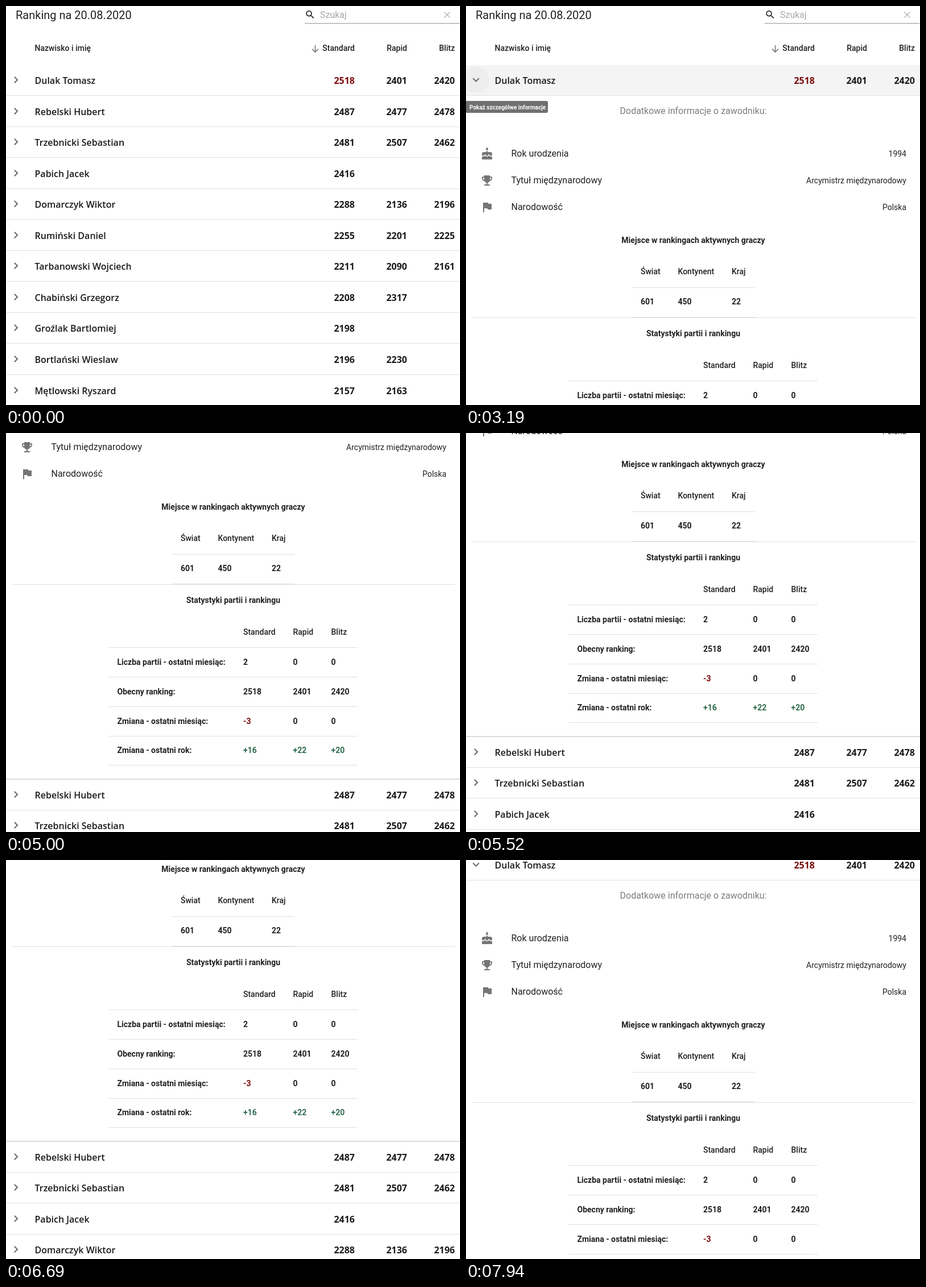
An HTML page for the animation above (8 s loop, 798x702 px).

```html
<!DOCTYPE html>
<html lang="pl">
<head>
<meta charset="utf-8">
<title>Ranking</title>
<style>
  html, body { margin: 0; width: 100%; height: 100%; overflow: hidden; background: #fff; }
  svg { display: block; width: 798px; height: 702px; }
  text { font: 500 14px Roboto, sans-serif; fill: #212121; white-space: pre; }
  .title { font-size: 20px; font-weight: 400; }
  .body { font-size: 16px; font-weight: 400; }
  .small { font-weight: 400; }
  .hint { fill: #a8a8a8; }
  .muted { fill: #7c7c7c; }
  .name { font: 600 16px "Open Sans", "Noto Sans", sans-serif; fill: #1a1a1a; }
  .num { font: 700 16px "Open Sans", "Noto Sans", sans-serif; fill: #1a1a1a; }
  .strong { font-weight: 600; }
  .red { fill: #7a0c0c; }
  .green { fill: #2f6b4f; }
  .tip { font-size: 10px; fill: #fff; }
</style>
</head>
<body>
<svg viewBox="0 0 798 702">
  <clipPath id="cut"><rect id="cutBox" y="158" width="798" height="0"/></clipPath>
  <clipPath id="round"><circle cx="17.5" cy="130" r="23"/></clipPath>
  <g id="page">
    <g id="head"></g>
    <g id="hover">
      <rect y="104" width="798" height="53" fill="#f4f4f4"/>
      <circle id="focus" cx="17.5" cy="130" r="23" fill="#ededed"/>
    </g>
    <circle id="ripple" cx="17.5" cy="130" clip-path="url(#round)"/>
    <g id="first"></g>
    <g id="detail" clip-path="url(#cut)"></g>
    <g id="rest"></g>
    <g id="tooltip">
      <rect x="-4" y="167" width="148" height="21" rx="3" fill="#616161" fill-opacity=".9"/>
    </g>
  </g>
</svg>
<script>
const $ = id => document.getElementById(id);
const LOOP = 8000, PITCH = 54.55, OPEN = 733;

function add(parent, tag, attrs, content) {
  const el = document.createElementNS('http://www.w3.org/2000/svg', tag);
  for (const k in attrs) el.setAttribute(k, attrs[k]);
  if (content !== undefined) el.textContent = content;
  return parent.appendChild(el);
}
const text = (g, s, x, y, cls = '', anchor = 'start') =>
  add(g, 'text', { x, y, class: cls, 'text-anchor': anchor }, s);
const line = (g, x1, x2, y, fill = '#e0e0e0') =>
  add(g, 'rect', { x: x1, y, width: x2 - x1, height: 1, fill });
const icon = (g, d, x, y, fill = '#757575', scale = 1) =>
  add(g, 'path', { d, fill, transform: `translate(${x} ${y}) scale(${scale})` });

const RIGHT = 'M10 6L8.59 7.41 13.17 12l-4.58 4.59L10 18l6-6z';
const DOWN = 'M16.59 8.59L12 13.17 7.41 8.59 6 10l6 6 6-6z';
const SEARCH = 'M15.5 14h-.79l-.28-.27C15.41 12.59 16 11.11 16 9.5 16 5.91 13.09 3 9.5 3S3 5.91 3 9.5 5.91 16 9.5 16c1.61 0 3.09-.59 4.23-1.57l.27.28v.79l5 4.99L20.49 19zm-6 0C7.01 14 5 11.99 5 9.5S7.01 5 9.5 5 14 7.01 14 9.5 11.99 14 9.5 14z';
const CAKE = 'M12 6c1.11 0 2-.9 2-2 0-.38-.1-.73-.29-1.03L12 0l-1.71 2.97c-.19.3-.29.65-.29 1.03 0 1.1.9 2 2 2zm4.6 9.99l-1.07-1.07-1.08 1.07c-1.3 1.3-3.58 1.31-4.89 0l-1.07-1.07-1.09 1.07C6.75 16.64 5.88 17 4.96 17c-.73 0-1.4-.23-1.96-.61V21c0 .55.45 1 1 1h16c.55 0 1-.45 1-1v-4.61c-.56.38-1.23.61-1.96.61-.92 0-1.79-.36-2.44-1.01zM18 9h-5V7h-2v2H6c-1.66 0-3 1.34-3 3v1.54c0 1.08.88 1.96 1.96 1.96.52 0 1.02-.2 1.38-.57l2.14-2.13 2.13 2.13c.74.74 2.03.74 2.77 0l2.14-2.13 2.13 2.13c.37.37.86.57 1.38.57 1.08 0 1.96-.88 1.96-1.96V12C21 10.34 19.66 9 18 9z';
const CUP = 'M19 5h-2V3H7v2H5c-1.1 0-2 .9-2 2v1c0 2.55 1.92 4.63 4.39 4.94.63 1.5 1.98 2.63 3.61 2.96V19H7v2h10v-2h-4v-3.1c1.63-.33 2.98-1.46 3.61-2.96C19.08 12.63 21 10.55 21 8V7c0-1.1-.9-2-2-2zM5 8V7h2v3.82C5.84 10.4 5 9.3 5 8zm14 0c0 1.3-.84 2.4-2 2.82V7h2v1z';
const FLAG = 'M14.4 6L14 4H5v17h2v-7h5.6l.4 2h7V6z';

// Header
const head = $('head'), ends = [613, 705, 789];
text(head, 'Ranking na 20.08.2020', 17, 23, 'title');
icon(head, SEARCH, 525, 5.6, '#212121', .8);
text(head, 'Szukaj', 552, 21, 'body hint');
add(head, 'path', { d: 'M770.5 10.5l10 10m0-10l-10 10', stroke: '#b5b5b5', 'stroke-width': 1.4 });
line(head, 525, 797, 30, '#949494');
text(head, 'Nazwisko i imię', 50.5, 79);
add(head, 'path', { d: 'M543.5 69v11M538 75.5l5.5 5.5 5.5-5.5', stroke: '#757575', 'stroke-width': 1.6, fill: 'none' });
['Standard', 'Rapid', 'Blitz'].forEach((s, i) => text(head, s, ends[i], 79, '', 'end'));

// Player rows
const players = [
  ['Dulak Tomasz', 2518, 2401, 2420],
  ['Rebelski Hubert', 2487, 2477, 2478],
  ['Trzebnicki Sebastian', 2481, 2507, 2462],
  ['Pabich Jacek', 2416],
  ['Domarczyk Wiktor', 2288, 2136, 2196],
  ['Rumiński Daniel', 2255, 2201, 2225],
  ['Tarbanowski Wojciech', 2211, 2090, 2161],
  ['Chabiński Grzegorz', 2208, 2317],
  ['Groźlak Bartlomiej', 2198],
  ['Bortlański Wieslaw', 2196, 2230],
  ['Mętlowski Ryszard', 2157, 2163]
];
let arrow;
players.forEach(([name, ...scores], i) => {
  const g = i ? $('rest') : $('first'), y = Math.round(i * PITCH);
  const mark = icon(g, RIGHT, 5.5, 118 + y, '#6a6a6a');
  if (!i) arrow = mark;
  text(g, name, 50.5, 137 + y, 'name');
  scores.forEach((s, k) => text(g, s, ends[k], 137 + y, i || k ? 'num' : 'num red', 'end'));
  line(g, 0, 798, 157 + y);
});
const edge = add($('rest'), 'rect', { y: 157, width: 798, height: 2, fill: '#dcdcdc' });

// Expanded details
const detail = $('detail');
text(detail, 'Dodatkowe informacje o zawodniku:', 399.5, 190, 'body muted', 'middle');
[[CAKE, 'Rok urodzenia', '1994'],
 [CUP, 'Tytuł międzynarodowy', 'Arcymistrz międzynarodowy'],
 [FLAG, 'Narodowość', 'Polska']].forEach(([d, label, value], i) => {
  icon(detail, d, 25, 248 + 47 * i);
  text(detail, label, 79.5, 265 + 47 * i, 'body');
  text(detail, value, 774, 265 + 47 * i, 'small', 'end');
});
text(detail, 'Miejsce w rankingach aktywnych graczy', 399.5, 417, 'strong', 'middle');
[['Świat', 601, 307], ['Kontynent', 450, 372.5], ['Kraj', 22, 467]].forEach(([label, value, x]) => {
  text(detail, label, x, 472);
  text(detail, value, x, 525, 'strong');
});
line(detail, 292, 507, 495);
line(detail, 292, 507, 547);
line(detail, 10, 789, 548);
text(detail, 'Statystyki partii i rankingu', 399.5, 581, 'strong', 'middle');
const cols = [417, 504.5, 571.5];
['Standard', 'Rapid', 'Blitz'].forEach((s, i) => text(detail, s, cols[i], 637));
line(detail, 180, 618, 659);
[['Liczba partii - ostatni miesiąc:', 2, 0, 0],
 ['Obecny ranking:', 2518, 2401, 2420],
 ['Zmiana - ostatni miesiąc:', '-3', 0, 0],
 ['Zmiana - ostatni rok:', '+16', '+22', '+20']].forEach(([label, ...values], i) => {
  const y = Math.round(51.75 * i);
  text(detail, label, 195.5, 690 + y, 'strong');
  values.forEach((v, k) => {
    const sign = String(v)[0];
    text(detail, v, cols[k], 690 + y, 'strong' + (sign === '-' ? ' red' : sign === '+' ? ' green' : ''));
  });
  line(detail, 180, 618, 711 + y);
});
text($('tooltip'), 'Pokaż szczegółwe informacje', 6, 181.5, 'tip strong');

// Motion
const ramp = (t, a, b) => Math.min(1, Math.max(0, (t - a) / (b - a)));
const ease = x => x * x * (3 - 2 * x);
const snap = (t, start, step) => start + Math.floor((t - start) / step) * step;

// [time, scroll offset, speed]
const path = [
  [3640, 0, 0], [4285, 130, .23], [5000, 282, .19], [6040, 389, .025],
  [6690, 396, 0], [7236, 396, 0], [7428, 365, -.4], [7940, 122, -.5]
];
function scrollAt(t) {
  if (t < 3700) return 0;
  t = t < 7000 ? snap(t, 3700, 65) : Math.min(7940, snap(t, 7300, 64));
  const i = Math.min(path.length - 2, path.findLastIndex(k => k[0] <= t));
  const [t0, p0, v0] = path[i], [t1, p1, v1] = path[i + 1];
  const d = t1 - t0, u = (t - t0) / d, w = 1 - u;
  return Math.round(w * w * (1 + 2 * u) * p0 + u * u * (3 - 2 * u) * p1 + d * u * w * (w * v0 - u * v1));
}

function draw(now) {
  const t = now % LOOP;
  const open = ease(ramp(snap(t, 1980, 65), 2000, 2300));
  const shift = Math.round(OPEN * open);
  const leave = 1 - ramp(t, 3230, 3470);
  const show = ramp(t, 1440, 1680);

  $('page').setAttribute('transform', `translate(0 ${-scrollAt(t)})`);
  $('cutBox').setAttribute('height', shift);
  $('rest').setAttribute('transform', `translate(0 ${shift})`);
  edge.setAttribute('visibility', open ? 'visible' : 'hidden');
  arrow.setAttribute('d', open ? DOWN : RIGHT);

  $('hover').setAttribute('opacity', t < 1470 ? 0 : show * leave);
  $('focus').setAttribute('opacity', ramp(t, 1980, 2180));
  $('ripple').setAttribute('r', 23 * ramp(t, 1960, 2200));
  $('ripple').setAttribute('opacity', t < 1980 ? 0 : .1 * (1 - ramp(t, 2200, 2500)));

  const size = t < 1470 ? 0 : ease(show);
  $('tooltip').setAttribute('opacity', size * leave);
  $('tooltip').setAttribute('transform', `translate(71 177) scale(${size}) translate(-71 -177)`);
  requestAnimationFrame(draw);
}
requestAnimationFrame(draw);
</script>
</body>
</html>
```
